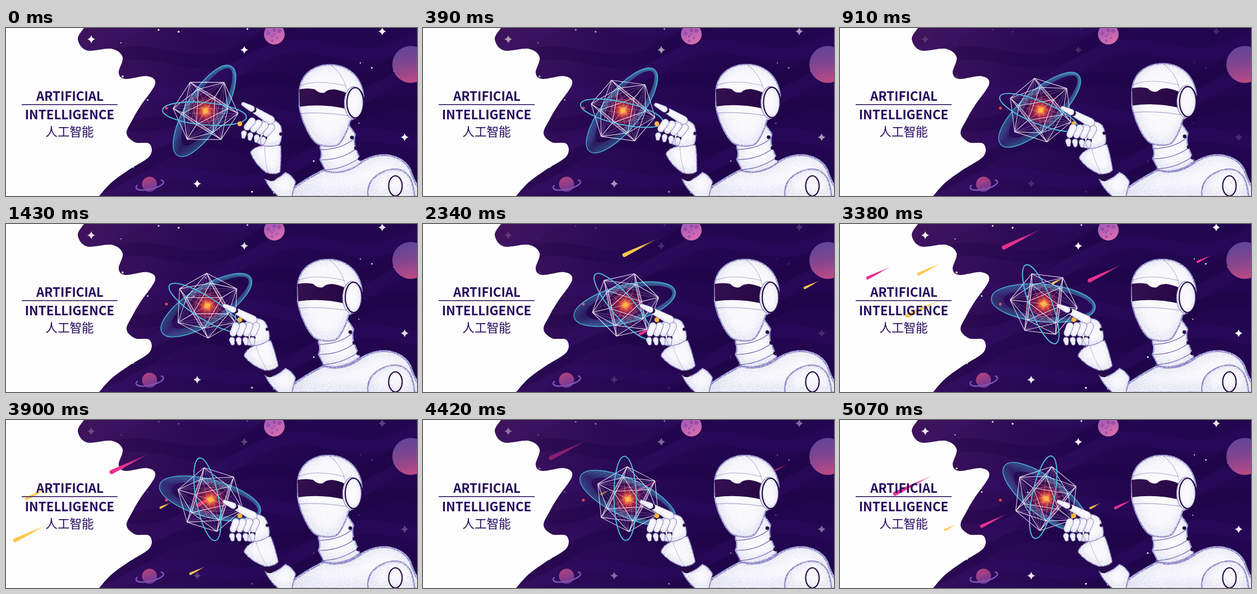
Write an HTML page with a canvas that moves like this. It is 733 px wide and 300 px high and loops after 5.2 s.

```html
<!DOCTYPE html>
<html lang="en">
<head>
<meta charset="utf-8">
<title>Artificial Intelligence</title>
<style>
  html, body { margin: 0; width: 100%; height: 100%; overflow: hidden; background: #fdfdfd; }
  canvas { position: absolute; left: 0; top: 0; width: 733px; height: 300px; }
  svg { position: absolute; left: 0; top: 0; }
  text { text-anchor: middle; fill: #25085c; font-family: "Noto Sans CJK SC", "Noto Sans", sans-serif; }
  .latin { font-size: 22.3px; font-weight: 700; }
</style>
</head>
<body>
<canvas id="stage" width="733" height="300"></canvas>
<svg width="240" height="300">
  <text class="latin" x="114" y="130">ARTIFICIAL</text>
  <path d="M28 136.7H199" stroke="#25085c" stroke-width="1.4"/>
  <text class="latin" x="113.5" y="163">INTELLIGENCE</text>
  <text x="113.5" y="193" font-size="21.6">人工智能</text>
</svg>
<script>
const ctx = document.getElementById("stage").getContext("2d");
const LOOP = 5200, STEP = 130, TAU = Math.PI * 2, DEG = Math.PI / 180;
const DARK = "#270a45", PINK = "#e8308f", YELLOW = "#ffc84f";
const clamp = v => Math.max(0, Math.min(1, v));

function random(seed) {
  return () => (seed = seed * 16807 % 2147483647) / 2147483647;
}

function gradient(x0, y0, x1, y1, ...colors) {
  const g = ctx.createLinearGradient(x0, y0, x1, y1);
  colors.forEach((c, i) => g.addColorStop(i / (colors.length - 1), c));
  return g;
}

function group(x, y, angle, draw) {
  ctx.save();
  ctx.translate(x, y);
  ctx.rotate(angle);
  draw();
  ctx.restore();
}

function disc(x, y, r, fill) {
  ctx.beginPath();
  ctx.arc(x, y, r, 0, TAU);
  ctx.fillStyle = fill;
  ctx.fill();
}

function ring(x, y, rx, ry, angle, color, width) {
  ctx.beginPath();
  ctx.ellipse(x, y, rx, ry, angle, 0, TAU);
  ctx.strokeStyle = color;
  ctx.lineWidth = width;
  ctx.stroke();
}

function line(d, color, width) {
  ctx.strokeStyle = color;
  ctx.lineWidth = width;
  ctx.stroke(new Path2D(d));
}

// Smooth open curve through all points
function smooth(points) {
  const path = new Path2D();
  path.moveTo(...points[0]);
  for (let i = 1; i < points.length; i++) {
    const [a, b, c, d] = [-2, -1, 0, 1].map(k => points[Math.max(0, Math.min(points.length - 1, i + k))]);
    path.bezierCurveTo(b[0] + (c[0] - a[0]) / 6, b[1] + (c[1] - a[1]) / 6,
      c[0] - (d[0] - b[0]) / 6, c[1] - (d[1] - b[1]) / 6, ...c);
  }
  return path;
}

// ---- space ----
const space = smooth([[139, 0], [128, 20], [144, 40], [188, 37], [208, 52], [201, 80], [213, 91], [252, 86],
  [266, 100], [240, 139], [226, 163], [215, 188], [230, 204], [256, 207], [256, 229], [218, 254], [188, 276], [166, 300]]);
space.lineTo(733, 300);
space.lineTo(733, 0);

function drawSpace() {
  ctx.fillStyle = "#fdfdfd";
  ctx.fillRect(0, 0, 733, 300);
  ctx.save();
  ctx.clip(space);
  ctx.fillStyle = gradient(150, 30, 500, 150, "#3e135c", "#2b0a56", "#22064f");
  ctx.fillRect(0, 0, 733, 300);
  for (let i = 0; i < 9; i++) {
    ctx.beginPath();
    for (let x = 120; x <= 740; x += 10)
      ctx.lineTo(x, 46 * i + 40 - (x - 120) * .2 + 22 * Math.sin(x / 55 + i));
    ctx.strokeStyle = i % 2 ? "rgba(22,0,62,.25)" : "rgba(62,24,125,.15)";
    ctx.lineWidth = 24;
    ctx.stroke();
  }
  ctx.restore();
}

function drawStars(t) {
  ctx.save();
  ctx.clip(space);
  ctx.globalAlpha = .12 + .88 * Math.cos(Math.PI * t / 1.64) ** 2;
  for (const [x, y] of [[152, 20], [425, 39], [671, 6], [711, 195], [341, 278]])
    group(x, y, 0, () => {
      ctx.fillStyle = "#fff";
      ctx.beginPath();
      ctx.moveTo(0, -7);
      for (let k = 0; k < 4; k++) {
        const a = k * TAU / 4;
        ctx.quadraticCurveTo(2 * Math.cos(a - TAU / 8), 2 * Math.sin(a - TAU / 8), 7 * Math.cos(a), 7 * Math.sin(a));
      }
      ctx.fill();
    });
  const next = random(2024);
  for (let i = 0; i < 26; i++) disc(190 + 540 * next(), 300 * next(), .8 + next(), "#fff");
  ctx.restore();
}

function drawPlanets() {
  const next = random(9);
  disc(478.5, 11, 18.5, gradient(470, -8, 488, 30, "#9a58b6", "#e06fb0"));
  for (let i = 0; i < 7; i++) {
    const a = i * 2.4, r = 5 * Math.sqrt(i);
    disc(478 + r * Math.cos(a), 11 + r * Math.sin(a), 1.5 + 2 * next(), "rgba(125,60,160,.55)");
  }
  disc(722, 65, 33, gradient(715, 32, 728, 98, "#5f459a", "#84458f", "#bd4b86"));
  disc(256, 279, 13.5, gradient(250, 265, 260, 293, "#b54380", "#6a3892"));
  ctx.strokeStyle = "#8055bd";
  ctx.lineWidth = 2.4;
  ctx.beginPath();
  ctx.ellipse(256.5, 280, 25, 8, -.22, -.55, Math.PI + .55);
  ctx.stroke();
}

// Showers: a moment in seconds, then head x, head y and length at that moment
const showers = [
  [2.34, [356, 57, 64], [384, 198, 40], [679, 115, 30]],
  [3.64, [237, 69, 72], [86, 116, 46], [-5, 123, 46], [65, 191, 66], [390, 128, 64], [326, 132, 21],
    [584, 94, 28], [379, 250, 30]],
  [5.07, [95, 133, 73], [445, 158, 21], [250, 191, 50], [186, 197, 22], [489, 158, 36]]
];

function drawMeteors(t) {
  const slope = .49, speed = 200, life = .75;
  let count = 0;
  for (const [moment, ...heads] of showers)
    for (const [x, y, length] of heads) {
      const color = count++ % 2 ? PINK : YELLOW, age = t - moment;
      if (Math.abs(age) > life) continue;
      const r = 1.2 + length / 28;
      group(x - speed * age, y + speed * slope * age, -Math.atan(slope), () => {
        ctx.globalAlpha = clamp((life - Math.abs(age)) / .2);
        ctx.fillStyle = gradient(0, 0, length * 1.1, 0, color, color, color + "22");
        ctx.beginPath();
        ctx.arc(r, 0, r, Math.PI / 2, Math.PI * 1.5);
        ctx.lineTo(length * 1.1, 0);
        ctx.fill();
      });
    }
}

// ---- crystal and its orbits ----
// Icosahedron seen along a face axis: radius, depth and turn of its four triangles
const vertices = [[.607, .795, 0], [.982, .188, 60], [.982, -.188, 0], [.607, -.795, 60]]
  .flatMap(([r, z, turn]) => [0, 120, 240].map(a => {
    const angle = (a + turn - 90) * DEG;
    return [r * Math.cos(angle), r * Math.sin(angle), z];
  }));
const project = ([x, y, z]) => [60 * (x + .12 * z), 60 * (y - .08 * z)];

function wires(min, max, color, width) {
  ctx.beginPath();
  vertices.forEach((a, i) => vertices.slice(0, i).forEach(b => {
    const d = Math.hypot(a[0] - b[0], a[1] - b[1], a[2] - b[2]);
    if (d < min || d > max) return;
    ctx.moveTo(...project(a));
    ctx.lineTo(...project(b));
  }));
  ctx.strokeStyle = color;
  ctx.lineWidth = width;
  ctx.stroke();
}

function drawGlow() {
  const g = ctx.createRadialGradient(0, 0, 0, 0, 0, 38);
  g.addColorStop(0, "#ffc04a");
  g.addColorStop(.14, "rgba(255,125,55,.95)");
  g.addColorStop(.35, "rgba(225,45,60,.6)");
  g.addColorStop(.65, "rgba(165,25,75,.25)");
  g.addColorStop(1, "rgba(140,20,80,0)");
  disc(0, 0, 38, g);
  const next = random(71);
  for (let i = 0; i < 130; i++) {
    const a = next() * TAU, r = 4 + 34 * next();
    disc(r * Math.cos(a), r * Math.sin(a), .6, i % 3 ? "rgba(255,80,65,.6)" : "rgba(255,165,70,.7)");
  }
}

function drawBand() {
  group(-2, 0, -59 * DEG, () => {
    for (let i = 0; i < 11; i++)
      ring(i * .8, 0, 93 - i * 1.3, 33.5 - i * .9, 0, `rgba(75,185,220,${i ? .62 - i * .03 : .95})`, i ? .8 : 1.5);
  });
}

function drawCrystal(t) {
  disc(286, 143, 2.6, "#e8434f");
  group(356 + 2.2 * t, 148 - 1.5 * t, 19 * t * DEG, () => {
    drawBand();
    drawGlow();
    group(0, 0, -27 * DEG, () => {
      wires(1.1, 1.8, "rgba(255,235,250,.38)", .7);
      wires(0, 1.1, "rgba(255,245,255,.85)", 1.1);
    });
    disc(0, 0, 4, "#ffb840");
    ring(-2, 5, 75, 20, 5 * DEG, "#52c0e2", 1.9);
  });
  disc(417, 171, 4.4, "#ffb640");
}

// ---- robot ----
const grain = (() => {
  const tile = document.createElement("canvas"), pen = tile.getContext("2d"), next = random(5);
  tile.width = tile.height = 96;
  pen.fillStyle = "rgba(255,255,255,.6)";
  for (let i = 0; i < 3200; i++) pen.fillRect(Math.floor(96 * next()), Math.floor(96 * next()), 1, 1);
  return ctx.createPattern(tile, "repeat");
})();

// White plate, shaded inwards from its lower left edge
function part(shape, depth = 8) {
  const path = typeof shape === "string" ? new Path2D(shape) : shape;
  ctx.save();
  ctx.fillStyle = "#f8f8fc";
  ctx.fill(path);
  ctx.clip(path);
  ctx.strokeStyle = ctx.shadowColor = "rgba(112,110,190,.75)";
  ctx.shadowBlur = depth * 1.4;
  ctx.shadowOffsetX = depth * .15;
  ctx.shadowOffsetY = -depth * .25;
  ctx.lineWidth = depth * .4;
  ctx.stroke(path);
  ctx.shadowColor = "transparent";
  ctx.fillStyle = grain;
  ctx.fill(path);
  ctx.restore();
  ctx.strokeStyle = "rgba(60,35,115,.4)";
  ctx.lineWidth = .7;
  ctx.stroke(path);
}

function capsule(x1, y1, r1, x2, y2, r2) {
  const a = Math.atan2(y2 - y1, x2 - x1), path = new Path2D();
  path.arc(x1, y1, r1, a + Math.PI / 2, a + Math.PI * 1.5);
  path.arc(x2, y2, r2, a - Math.PI / 2, a + Math.PI / 2);
  path.closePath();
  part(path, 3.5);
}

function drawHand(rest) {
  group(474, 265, 18 * DEG * rest, () => {
    ctx.translate(-474, -265);
    part("M424 236 Q426 224 444 216 L468 200 Q477 212 486 253 Q480 262 462 262 Q438 254 424 236Z", 8);
    line("M446 218 Q452 240 466 261", "rgba(70,50,130,.4)", .8);
    disc(468, 204, 5, DARK);
    disc(430, 220, 4, DARK);
    part("M424 178 Q444 160 462 174 Q472 190 470 207 Q450 222 428 216 Q420 198 424 178Z", 7);
    disc(466, 188, 3, DARK);

    group(436, 169, -14 * DEG * rest, () => {
      capsule(4, 2, 8, -23, -12, 6);
      disc(-27, -14, 5, DARK);
      capsule(-31, -16, 5.8, -46, -23, 3.6);
    });

    for (let i = 0; i < 4; i++) {
      const x = 441 - 12 * i;
      disc(x - 1, 203, 5, DARK);
      capsule(x - 2, 207, 5.2, x - 1, 213, 3.6);
      capsule(x + 5, 182, 6.6, x, 195, 6);
    }
  });
}

function drawArm(rest) {
  part("M461 269 Q476 278 498 257 Q511 262 517 275 L510 303 H488 Q469 289 461 269Z", 9);
  disc(470 + 4 * rest, 264, 9.5, DARK);
  drawHand(rest);
}

function drawBody() {
  part("M494 303 L506 289 Q530 270 566 252 Q602 262 634 237 Q668 217 700 231 Q721 241 726 263 Q731 276 738 286 V303Z", 18);
  part("M645 303 Q640 270 672 256 Q706 242 722 268 Q728 282 730 303Z", 12);
  ring(694.5, 282, 12, 18, 0, DARK, 2.2);
}

function drawHead() {
  part("M560 190 L608 168 L621 187 Q617 200 622 213 L632 238 Q602 262 567 254 L556 233 Q561 222 556 211Z", 12);
  for (let i = 0; i < 3; i++) {
    const y = 215 + 18 * i;
    line(`M${556 + 3 * i} ${y} Q596 ${y} ${619 + 4 * i} ${y - 21}`, "#6b6ab4", 1.2);
    disc(614 + 7 * i, 193 + 19 * i, 3.2, DARK);
  }

  part("M519 112 C520 80 545 62 575 62 C606 62 632 82 636 118 L630 150 Q620 160 612 163 " +
    "Q606 184 598 197 Q592 208 583 209 Q566 211 553 206 Q540 199 527 167 Q521 152 519 138Z", 12);
  line("M521 101 Q550 88 604 101", "rgba(80,60,150,.55)", .8);
  line("M574 62 Q598 78 605 108", "rgba(80,60,150,.55)", .8);
  line("M522 150 Q560 147 606 154", "rgba(80,60,150,.6)", .9);

  ctx.fillStyle = gradient(520, 105, 605, 140, "#35104f", "#250744");
  ctx.fill(new Path2D("M520 107 Q536 104 548 107 Q555 115 565 113 Q570 107 582 107 Q596 109 607 115 L604 142 Q562 132 521 138Z"));

  const ear = new Path2D();
  ear.ellipse(617, 131, 17, 29, 0, 0, TAU);
  part(ear, 6);
  ring(620, 131, 15, 27, 0, DARK, 2.2);
}

function draw(t) {
  const p = clamp(t / 1.3), rest = 1 - p * p * (3 - 2 * p);
  drawSpace();
  drawStars(t);
  drawMeteors(t);
  drawPlanets();
  drawCrystal(t);
  drawBody();
  group(3 * rest, 2.5 * rest, 0, drawHead);
  drawArm(rest);
}

const begin = performance.now();
let shown = -1;
function tick() {
  const step = Math.floor((performance.now() - begin) % LOOP / STEP);
  if (step !== shown) draw(step * STEP / 1000);
  shown = step;
  requestAnimationFrame(tick);
}
tick();
</script>
</body>
</html>
```
